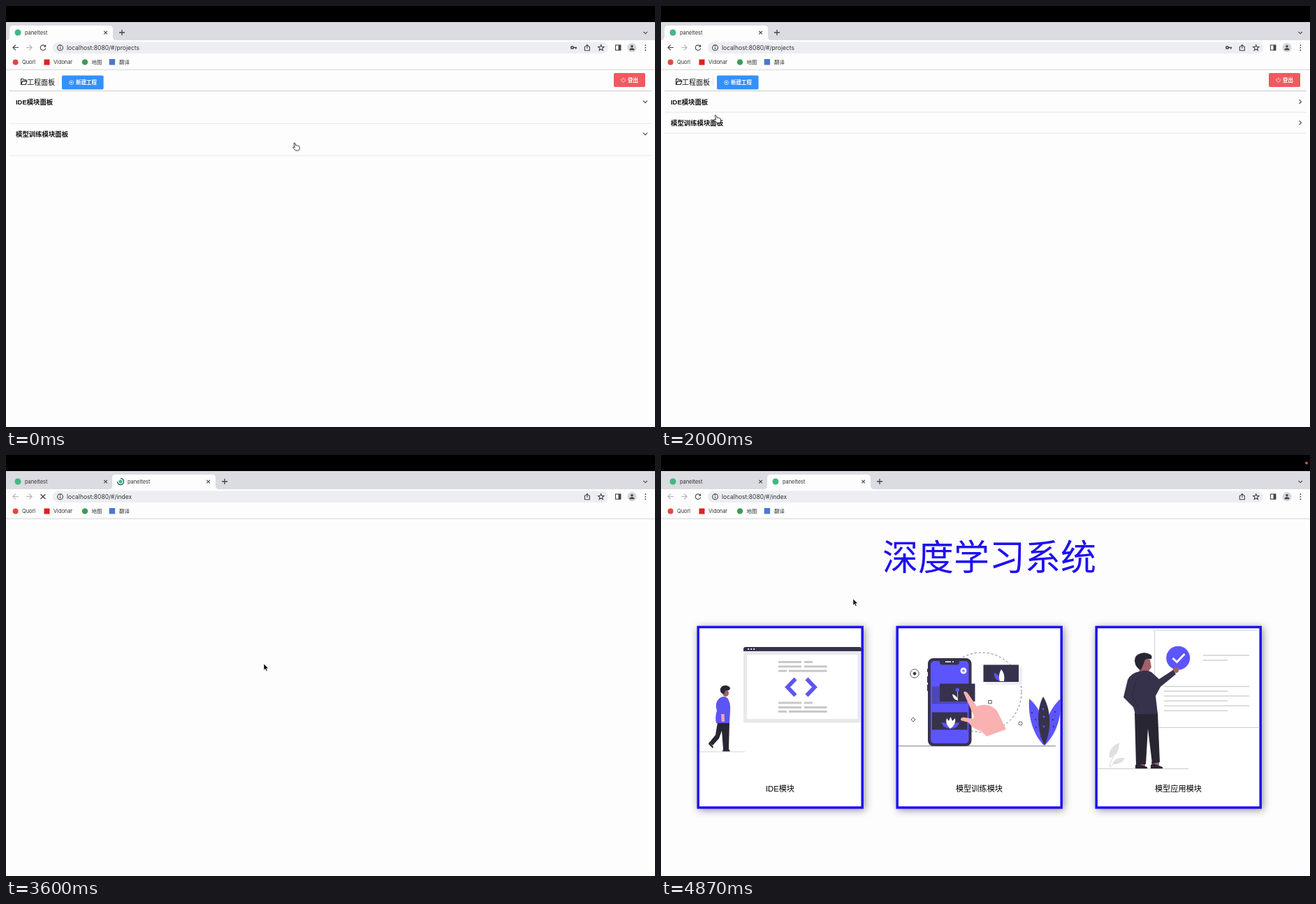
Recreate the animation shown at these times as an HTML page. Size 929 px wide and 603 px high, loop 4.94 s.

```html
<!DOCTYPE html>
<html lang="zh">
<head>
<meta charset="utf-8">
<style>
html, body { margin: 0; width: 100%; height: 100%; overflow: hidden; background: #fdfdfd; }
svg { display: block; --accent: #5c55fb; --frame: #1e0ff2; }
text { font-family: "Liberation Sans", "Noto Sans CJK SC", "Noto Sans CJK", sans-serif; fill: #111; }
.ui { font: 7.4px Inter, "Noto Sans CJK SC", "Noto Sans CJK", sans-serif; fill: #333; }
.bold { font-weight: bold; font-size: 9.4px; }
.btn { font-weight: bold; font-size: 7.5px; fill: #fff; }
.line { fill: none; stroke: #444; stroke-width: 1.1; }
.rule { fill: none; stroke: #e6e6e9; }
.grey { fill: none; stroke: #d2d2d4; stroke-width: 1.6; }
.dark { fill: #37324c; }
.ink { fill: #292633; }
.skin { fill: #a0616a; }
.accent { fill: var(--accent); }
.card { fill: #fff; stroke: var(--frame); stroke-width: 3.5; filter: drop-shadow(2px 2px 6px rgba(0,0,0,.42)); }
.label { font-size: 11.2px; text-anchor: middle; fill: #000; }
</style>
</head>
<body>
<svg width="929" height="603" viewBox="0 0 929 603">
  <rect width="929" height="603" fill="#fdfdfd"/>
  <rect width="929" height="23"/>
  <circle id="recording" cx="924" cy="11.5" r="2" fill="#d9542f"/>

  <!-- browser frame -->
  <rect y="23" width="929" height="26" fill="#dadce1"/>
  <path id="tab" fill="#fdfdfd" d="M0 49q5 0 5-5v-11q0-5 5-5h138q5 0 5 5v11q0 5 5 5z"/>
  <circle cx="17" cy="38" r="4.5" fill="#41b883"/>
  <text class="ui" x="27" y="40.6">paneltest</text>
  <path class="line" d="M140.3 35.8l4.6 4.6m0-4.6l-4.6 4.6"/>
  <g id="tab2">
    <circle id="icon" cx="164" cy="38" r="4.5" fill="#41b883"/>
    <path id="spinner" class="line" style="stroke:#2a5a78;stroke-width:1.4" d="M164 33.5a4.5 4.5 0 1 1-4.5 4.5"/>
    <text class="ui" x="174" y="40.6">paneltest</text>
    <path class="line" d="M287.3 35.8l4.6 4.6m0-4.6l-4.6 4.6"/>
  </g>
  <path id="plus" class="line" style="stroke-width:1.3" d="M162 38h8m-4-4v8"/>
  <path class="line" d="M912.5 37l2.7 2.6 2.7-2.6"/>
  <path id="back" class="line" d="M18 59.5H10m3.8-3.9l-3.9 3.9 3.9 3.9"/>
  <path class="line" style="stroke:#b4b4b6" d="M29 59.5h8m-3.8-3.9l3.9 3.9-3.9 3.9"/>
  <g id="reload">
    <path class="line" d="M56 57.2a3.8 3.8 0 1 0 .8 3.3"/>
    <path d="M57.2 55.2v3.6h-3.6z" fill="#444"/>
  </g>
  <path id="stop" class="line" style="stroke-width:1.3" d="M49.6 56.2l6.8 6.8m0-6.8l-6.8 6.8"/>
  <rect x="67" y="51.5" width="795" height="16.5" rx="8.2" fill="#eceef2"/>
  <circle class="line" cx="77.5" cy="59.8" r="3.9"/>
  <path class="line" d="M77.5 59.2v2.8m0-4.9v1.1"/>
  <text id="url" class="ui" x="87" y="62.7" style="font-size:8.5px"></text>
  <g id="key" class="line">
    <circle cx="810.5" cy="59.5" r="1.7" stroke-width="1.6"/>
    <path d="M812.5 59.5h4.5m-1.2 0v2" stroke-width="1.6"/>
  </g>
  <path class="line" d="M830 58.3h-1.6v5.4h7v-5.4h-1.6M831.9 61v-5.2m-2 1.8l2-2 2 2"/>
  <path class="line" d="M851.8 55.6l1.2 2.8 3 .2-2.3 2 .7 3-2.6-1.6-2.6 1.6.7-3-2.3-2 3-.2z"/>
  <rect class="line" x="872.5" y="56" width="7.4" height="7.2"/>
  <rect x="876.6" y="56" width="3.4" height="7.2" fill="#444"/>
  <circle cx="896" cy="59.7" r="6.6" fill="#d5d7dd"/>
  <circle cx="896" cy="57.8" r="1.8" fill="#444"/>
  <path d="M892.4 63.2q0-3 3.6-3t3.6 3z" fill="#444"/>
  <path d="M915.4 56.2v.01m0 3.5v.01m0 3.5v.01" stroke="#444" stroke-width="1.8" stroke-linecap="round"/>
  <circle cx="13.6" cy="80.4" r="4" fill="#df4a3f"/>
  <rect x="54.5" y="76.5" width="8" height="8" fill="#e01f1f"/>
  <circle cx="113" cy="80.4" r="4.2" fill="#3d9a58"/>
  <rect x="147.7" y="76" width="8.4" height="8.4" fill="#4a78cf"/>
  <g class="ui">
    <text class="ui" x="23" y="83.1">Quorl</text>
    <text class="ui" x="68" y="83.1">Vidonar</text>
    <text class="ui" x="122.5" y="83.2">地图</text>
    <text class="ui" x="162" y="83.2">翻译</text>
  </g>
  <path d="M0 91.2h929" stroke="#d6d6d8"/>

  <g id="projects">
    <path class="line" style="stroke:#222" d="M21.6 112.5v-8h3l1.2 1.3h3v1.8M21.6 112.5l2-4.9h6.3l-1.7 4.9z"/>
    <text x="30" y="112.7" style="font-size:10px;font-weight:500">工程面板</text>
    <path class="rule" d="M74.5 103v11"/>
    <rect id="create" x="80" y="99.5" width="59.6" height="20" rx="1.8"/>
    <g fill="none" stroke="#fff" stroke-width=".7">
      <circle cx="93.6" cy="109.6" r="3"/>
      <path d="M92 109.6h3.2m-1.6-1.6v3.2"/>
      <path d="M881.8 103.8a2.8 2.8 0 1 0 3.6 0"/>
    </g>
    <text class="btn" x="100" y="112.4">新建工程</text>
    <rect x="870" y="96" width="45" height="20" rx="1.8" fill="#ef5b60"/>
    <path d="M881.8 103.8a2.8 2.8 0 1 0 3.6 0m-1.8-1.3v3" fill="none" stroke="#fff" stroke-width=".7"/>
    <text class="btn" x="890" y="108.9">登出</text>
    <path d="M5 121.7h919" stroke="#c9c9cc"/>
    <text class="bold" x="14" y="140.6">IDE模块面板</text>
    <path id="arrow1" class="line" d="M-1.5-3l3 3-3 3"/>
    <g id="panel2">
      <path class="rule" d="M5 0h919"/>
      <text class="bold" x="14" y="18.6">模型训练模块面板</text>
      <path id="arrow2" class="line" d="M-1.5-3l3 3-3 3"/>
    </g>
    <path id="end" class="rule" d="M5 0h919"/>
  </g>

  <g id="index">
    <text x="470" y="165.3" text-anchor="middle" style="font-size:51px;fill:var(--frame)">深度学习系统</text>
    <rect class="card" x="53.2" y="246.5" width="235" height="258.5"/>
    <rect class="card" x="338.2" y="246.5" width="235" height="258.5"/>
    <rect class="card" x="623.2" y="246.5" width="235" height="258.5"/>
    <rect id="tint" x="340" y="452" width="231.5" height="51.2" fill="#f4f6fc"/>
    <text class="label" x="170.5" y="482">IDE模块</text>
    <text id="label2" class="label" x="455.5" y="482">模型训练模块</text>
    <text class="label" x="740.5" y="482">模型应用模块</text>

    <!-- code window -->
    <rect x="118" y="277" width="167.5" height="106.5" rx="2" fill="#e9e9ea"/>
    <rect x="123" y="286" width="158.5" height="92" fill="#fff"/>
    <path class="dark" d="M118 281v-3q0-3 3-3h163q3 0 3 3v3z"/>
    <path d="M125.2 278v.01m4 0v.01m4 0v.01" stroke="#fff" stroke-width="2.2" stroke-linecap="round"/>
    <path id="code" d="M168 296.5h33m4 0h12M168 303h33m4 0h32.500M168 309.200h12m3 0h54.500" stroke="#c8c8c9" stroke-width="3"/>
    <use href="#code" y="58.4"/>
    <path d="M192.500 320.500l-11.500 12 11.500 12M208.500 320.500l11.500 12-11.500 12" fill="none" stroke="#5c55f3" stroke-width="5.600"/>
    <path class="grey" style="stroke-width:1" d="M55 425h65"/>
    <path class="ink" d="M81 383h17l-1 38h-8l-2-26-4 11-9 10-5-4 9-11z"/>
    <path class="ink" d="M69 411l6 7-1 2-6-6zM89 421h8l2 3.500H88z"/>
    <ellipse class="skin" cx="92.500" cy="341" rx="4.500" ry="5"/>
    <path class="ink" d="M85 338q-1-8 8-8 6 1 6 5l-2 2-5 .5-1.500 4.500q-5 0-5.500-4z"/>
    <path fill="#5c55f5" d="M84 348q6-4 11 0 5 6 4 19l-1 17-19 0q-2-8 1-18-4-11 4-18z"/>
    <path d="M88.300 371l.6 11" stroke="#f3a5a7" stroke-width="4.500"/>

    <!-- phone -->
    <path d="M340 416.700h225" stroke="#a5a5aa" stroke-width="1.500"/>
    <circle cx="459" cy="340" r="57" fill="none" stroke="#77757f" stroke-dasharray="3 3"/>
    <path d="M382 306v5m0 6v9m0 3v9" stroke="#37324c" stroke-width="2"/>
    <rect class="dark" x="382" y="291" width="62.500" height="126" rx="8"/>
    <rect class="accent" x="386" y="295" width="54.500" height="118" rx="5"/>
    <path class="dark" d="M397 294h32q-2 0-2 3 0 3.500-4 3.500h-20q-4 0-4-3.500 0-3-2-3z"/>
    <path d="M407 296.300h8m2 0h2" stroke="#fff" stroke-width="1.600"/>
    <circle cx="433" cy="309" r="4.500" fill="#f3f3ff"/>
    <path d="M431 309h4m-2-2v4" stroke="var(--accent)"/>
    <rect x="388" y="331.500" width="50" height="25" fill="#37324c" opacity=".4"/>
    <rect x="465" y="304" width="52" height="25" fill="#efeef5"/>
    <path class="dark" d="M399 327.500h50.500v25.500H399zM388 368.500h50.500v25H388zM461.500 300.500H512V325h-50.500z"/>
    <circle class="accent" cx="424.300" cy="336.500" r="2.700"/>
    <path d="M424.500 339v13m0-1q-6-1-7-8 6 2 7 8" fill="#fff" stroke="#fff" stroke-width=".7"/>
    <path class="accent" d="M414 392q-11-1-12-9 8 0 12 9 4-9 13-9-2 9-13 9zM477 312q-1 9 8 12 1-9-8-12z"/>
    <path fill="#fff" d="M414 392q-8-7-5-15l3 4 2.500-6 2.500 6 4-4q2 9-7 15zM485 324q-3-9 2-17 6 7 4 17z"/>
    <path fill="#fab1b2" d="M433 340q2-3 6 1l13 19q19-7 30 8l12 25-28 10-8-8q-11-2-18-12l-11-3q0-5 6-4l12 2 1-4z"/>
    <g class="line" style="stroke-width:.9">
      <circle cx="363" cy="313" r="6.200"/>
      <circle cx="363" cy="313" r="2" fill="#333"/>
      <path d="M361 376l3 3-3 3-3-3zM468.700 351.500h4.500v4.500h-4.500z"/>
      <circle cx="514.500" cy="384.500" r="2.600"/>
    </g>
    <path class="accent" d="M527 349C525 380 535 402 548 416 554 385 542 362 527 349zM572 349C574 382 562 404 549 416 545 385 558 362 572 349z"/>
    <path class="dark" d="M547 346C537 365 538 395 549 416 559 395 559 365 547 346z"/>
    <path d="M531 369v.01m5 10v.01m1 11v.01m7 13v.01m20-35v.01m-3 11v.01m1 10v.01m-8 8v.01" stroke="#37324c" stroke-width="2.200" stroke-linecap="round"/>
    <path d="M547 364v.01m1 11v.01m0 14v.01" stroke="var(--accent)" stroke-width="2.800" stroke-linecap="round"/>

    <!-- presenter -->
    <path class="grey" style="stroke-width:1.200" d="M856.500 251H706.500V390.300H856.500M625 449.300H755"/>
    <path class="grey" d="M776 287h66M776 294h35M720 331.500h122M720 338.400h91M720 345.300h122M720 352.300h91M720 359.200h122M720 366.200h91"/>
    <circle cx="740.200" cy="290.700" r="17" fill="#5c55fb"/>
    <path d="M732.500 291l6 5.500 11-11.500" fill="none" stroke="#fff" stroke-width="3"/>
    <path fill="#e0e0e1" d="M656 412q-17 8-14 22 14-4 14-22zM664 434q-14-2-18 8 12 3 18-8z"/>
    <path class="grey" style="stroke-width:.8" d="M642 447q1-9 6-16m-5 17q3-6 9-7"/>
    <path class="skin" d="M683 293h17l2 11-3 4-1 5h-13zM680 439h13v7h-13zM702 439h11v7h-11z"/>
    <path class="ink" d="M678 295q0-9 9-11 6-2 12 1 5 2 3 7l-9 1-3 8-3 7q-8-3-9-13z"/>
    <path class="ink" d="M678 369h33l3 71-11 2-6-50-3 51h-14z"/>
    <path class="ink" d="M679 449v-5l4-2 13 5v2zM701 449v-5l4-2 13 5v2z"/>
    <circle class="skin" cx="737" cy="308" r="4.300"/>
    <path class="dark" d="M685 310q10-3 17 1l11 10 20-13 4 6-22 18-7 13 3 26h-32l-3-10-14-14 6-25q5-10 17-12z"/>
    <path d="M679 325l-4 20 9 18" fill="none" stroke="#292633" stroke-width=".8"/>
  </g>

  <path id="hand" fill="#fff" stroke="#222" stroke-width=".9" stroke-linejoin="round" d="M2 1.500q1.200-1.200 2 .4l.9 3q1.300-.8 2 .2 1.300-.5 1.700.5 1.300-.2 1.400 1l.2 2.700q0 2-1.500 2.700H4.600L1 8.300Q.2 6.800 1.900 6.900l1.400.8z"/>
  <path id="pointer" stroke="#fff" stroke-width=".6" d="M0 0v9.200l2.100-1.900 1.500 3.300 1.600-.7-1.500-3.200h2.900z"/>
</svg>
<script>
const LOOP = 4940, OPEN_TAB = 2800, LOADED = 3665, RECORDING = 3900;
const $ = id => document.getElementById(id);
const clamp = v => Math.min(1, Math.max(0, v));
const smooth = v => (1 - Math.cos(Math.PI * clamp(v))) / 2;
const show = (id, on) => $(id).style.display = on ? '' : 'none';
const move = (id, x, y, turn = 0) => $(id).setAttribute('transform', `translate(${x} ${y}) rotate(${turn})`);

// time, x, y of the mouse
const route = [
  [0, 410, 195], [70, 410, 195], [740, 42.5, 145], [1330, 42.5, 145], [1470, 70.5, 152],
  [1640, 74, 157], [1950, 74, 157], [2400, 114.5, 102.5], [2930, 114.5, 102.5],
  [3470, 368, 300], [3600, 369, 299], [3670, 373, 296], [3900, 373, 296], [4600, 275, 206], [LOOP, 275, 206]
];

function mouseAt(t) {
  const i = route.findIndex(stop => stop[0] > t);
  const [t0, x0, y0] = route[i - 1], [t1, x1, y1] = route[i];
  const k = smooth((t - t0) / (t1 - t0));
  return [x0 + (x1 - x0) * k, y0 + (y1 - y0) * k];
}

function draw() {
  const t = performance.now() % LOOP;
  const [x, y] = mouseAt(t);
  const opened = t >= OPEN_TAB, loaded = t >= LOADED;

  show('projects', !opened);
  show('index', loaded);
  show('tab2', opened);
  show('key', !opened);
  show('stop', opened && !loaded);
  show('reload', !opened || loaded);
  show('spinner', !loaded);
  show('recording', t >= RECORDING);
  show('hand', !opened);
  show('pointer', opened);
  move('hand', x, y);
  move('pointer', x, y);

  move('tab', opened ? 147 : 0, 0);
  move('plus', opened ? 147 : 0, 0);
  $('back').style.stroke = opened ? '#b4b4b6' : '';
  $('url').textContent = 'localhost:8080/#/' + (opened ? 'index' : 'projects');
  $('icon').setAttribute('r', loaded ? 3.3 + 1.2 * clamp((t - LOADED) / 200) : 2.6);
  $('spinner').setAttribute('transform', `rotate(${(t - 3600) * 0.36} 164 38)`);

  const fold1 = smooth((t - 860) / 300), fold2 = smooth((t - 1660) / 300);
  const top2 = 152.2 + 16 * (1 - fold1);
  move('arrow1', 915, 137.2, 90 * (1 - fold1));
  move('panel2', 0, top2);
  move('arrow2', 915, 15, 90 * (1 - fold2));
  move('end', 0, top2 + 30 + 16 * (1 - fold2));
  const onButton = x > 78 && x < 138 && y > 98 && y < 119;
  $('create').style.fill = onButton ? '#5ba3f9' : '#3490fb';

  const onCard = loaded && x > 337 && x < 575 && y > 245;
  const root = document.querySelector('svg').style;
  root.setProperty('--accent', onCard ? '#348ffb' : '#5c55fb');
  root.setProperty('--frame', onCard ? '#1e14d2' : '#1e0ff2');
  show('tint', onCard);
  $('label2').style.fontSize = onCard ? '11.6px' : '';
  requestAnimationFrame(draw);
}
draw();
</script>
</body>
</html>
```
